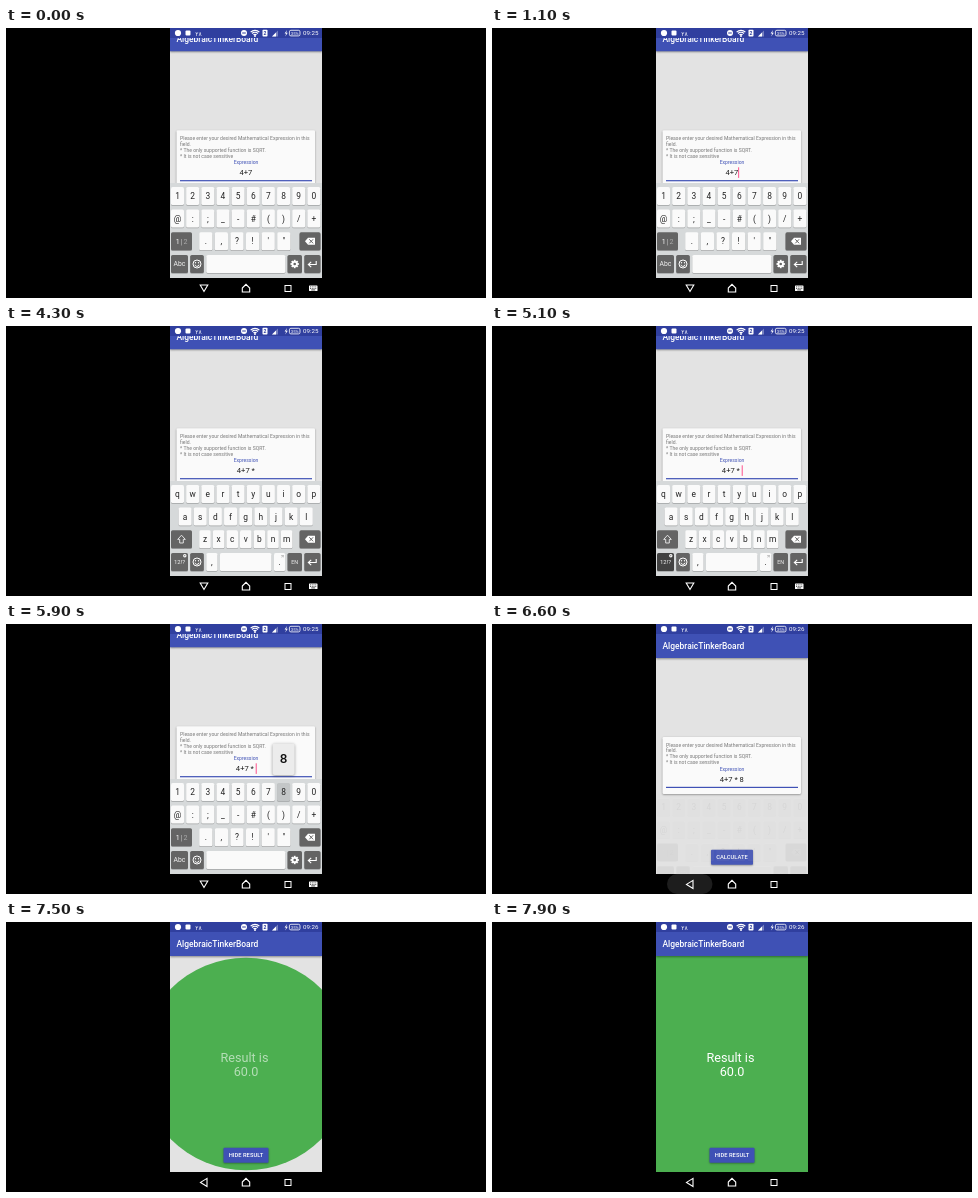
Write an HTML page with a canvas that moves like this. It is 480 px wide and 270 px high and loops after 8 s.

```html
<!DOCTYPE html>
<html lang="en">
<head>
<meta charset="utf-8">
<title>Calculator demo</title>
<style>
html, body { margin: 0; width: 100%; height: 100%; overflow: hidden; background: #000; }
canvas { display: block; width: 480px; height: 270px; }
</style>
</head>
<body>
<canvas id="stage" width="480" height="270"></canvas>
<script>
const g = document.getElementById('stage').getContext('2d');
const LOOP = 8000, INDIGO = '#3f51b5', GREEN = '#4caf50';
const LEFT = 164, WIDTH = 152, MID = 240;
const cursorOn = [[100, 600], [1000, 2000], [2600, 3000], [3100, 3400], [3900, 4300], [4800, 5300], [5600, 6300]];
const pages = {
  symbols: ['1234567890', '@:;_-#()/+', '.,?!\'"'],
  more: ['~^%*|[]<>=', '$€£¥&{}°\\`', '«»¿¡´¨'],
  letters: ['qwertyuiop', 'asdfghjkl', 'zxcvbnm']
};

const within = (t, a, b) => t >= a && t < b;

function rect(x, y, w, h, color) {
  g.fillStyle = color;
  g.fillRect(x, y, w, h);
}

function round(x, y, w, h, r, color) {
  g.fillStyle = color;
  g.beginPath();
  g.roundRect(x, y, w, h, r);
  g.fill();
}

function raised(x, y, w, h, r, color, blur = 2) {
  g.save();
  g.shadowColor = 'rgba(0,0,0,.4)';
  g.shadowBlur = blur;
  g.shadowOffsetY = .7;
  round(x, y, w, h, r, color);
  g.restore();
}

function text(s, x, y, size, color, align = 'center', weight = 400, family = 'Roboto') {
  g.font = `${weight} ${size}px ${family}, sans-serif`;
  g.textAlign = align;
  g.fillStyle = color;
  g.fillText(s, x, y);
}

function disc(x, y, r, color) {
  g.fillStyle = color;
  g.beginPath();
  g.arc(x, y, r, 0, 7);
  g.fill();
}

// Points are given as x0, y0, x1, y1, ...
function path(points, color, fill, width = 1) {
  g.beginPath();
  for (let i = 0; i < points.length; i += 2) g.lineTo(points[i], points[i + 1]);
  if (fill) {
    g.fillStyle = color;
    g.fill();
  } else {
    g.strokeStyle = color;
    g.lineWidth = width;
    g.stroke();
  }
}

function statusBar(t) {
  rect(LEFT, 0, WIDTH, 10, '#303f9f');
  disc(172, 5, 3.1, '#fff');
  round(179.5, 2.5, 5, 5, 1, '#fff');
  text('٢٨', 192.5, 7.5, 6, '#fff', 'center', 400, '"DejaVu Sans"');
  disc(238, 5, 3, '#fff');
  rect(236.2, 4.5, 3.6, 1, '#303f9f');
  g.strokeStyle = '#fff';
  g.lineWidth = 1.2;
  for (const r of [2.2, 4.2, 6.2]) {
    g.beginPath();
    g.arc(249, 8.5, r, -Math.PI * .75, -Math.PI * .25);
    g.stroke();
  }
  disc(249, 8, 1, '#fff');
  round(256.5, 1.8, 5, 6.8, .8, '#fff');
  text('2', 259, 7.2, 5, '#303f9f', 'center', 700);
  path([266, 8.5, 272, 8.5, 272, 2.5], 'rgba(255,255,255,.35)', true);
  path([266, 8.5, 270, 8.5, 270, 4.5], '#fff', true);
  path([281, 2, 278.6, 5.5, 280.2, 5.5, 279.2, 8.5, 281.8, 4.8, 280.2, 4.8], '#fff', true);
  g.strokeStyle = '#fff';
  g.lineWidth = .8;
  g.beginPath();
  g.roundRect(283.4, 2.3, 10.6, 5.6, 1.5);
  g.stroke();
  text('35%', 288.7, 6.7, 4.3, '#fff');
  text(t < 6000 ? '09:25' : '09:26', 312.5, 7.3, 6.2, '#fff', 'right');
}

function appBar(dy) {
  raised(LEFT, dy + 10, WIDTH, 24, 0, INDIGO);
  text('AlgebraicTinkerBoard', 170.5, dy + 25, 8.44, '#fff', 'left', 500);
}

function button(label, w, pressed) {
  raised(MID - w / 2, 225.8, w, 15, 1, pressed ? '#5565bf' : INDIGO, pressed ? 4 : 2);
  text(label, MID, 235.4, 5.8, '#fff', 'center', 500);
}

function card(t, dy) {
  raised(170.5, 113 + dy, 138.5, 57, 1.2, '#fafafa');
  ['Please enter your desired Mathematical Expression in this', 'field.',
    '* The only supported function is SQRT.', '* It is not case sensitive']
    .forEach((line, i) => text(line, 174, 122.5 + dy + i * 5.9, 5.06, '#777', 'left'));
  text('Expression', MID, 146.6 + dy, 5.06, INDIGO);
  const value = t < 3900 ? '4+7' : t < 4800 ? '4+7 *' : t < 6000 ? '4+7 * ' : '4+7 * 8';
  text(value, 239.8, 158 + dy, 7.6, '#222');
  const end = 239.8 + g.measureText(value).width / 2;
  rect(174, 162.8 + dy, 132, 1.2, INDIGO);
  if (cursorOn.some(([a, b]) => within(t, a, b))) rect(end, 150 + dy, .9, 10.6, '#ff4081');
}

function key(x, y, w, label, pressed, dark, size = 8.4) {
  const color = dark ? (pressed ? '#424242' : '#646464') : (pressed ? '#c3c6c7' : '#fafafa');
  round(x, y + .8, w, 18, 1.6, 'rgba(0,0,0,.25)');
  round(x, y, w, 18, 1.6, color);
  if (label) text(label, x + w / 2, y + 9 + size * .36, size, dark ? '#f2f2f2' : '#222');
}

function popup(x, label) {
  raised(x - 11, 119.5, 22, 31.5, 2, '#ececec', 3);
  text(label, x, 139.3, 13.5, '#111', 'center', 500);
}

function smiley(x, y) {
  g.strokeStyle = '#fff';
  g.lineWidth = 1;
  g.beginPath();
  g.arc(x, y, 4, 0, 7);
  g.stroke();
  disc(x - 1.5, y - 1.2, .7, '#fff');
  disc(x + 1.5, y - 1.2, .7, '#fff');
  g.beginPath();
  g.arc(x, y + .3, 2.1, .2, Math.PI - .2);
  g.stroke();
}

function gear(x, y) {
  g.strokeStyle = '#fff';
  g.lineWidth = 1.8;
  for (let a = 0; a < 8; a++) {
    const c = Math.cos(a * Math.PI / 4), s = Math.sin(a * Math.PI / 4);
    g.beginPath();
    g.moveTo(x + c * 2, y + s * 2);
    g.lineTo(x + c * 4.2, y + s * 4.2);
    g.stroke();
  }
  disc(x, y, 3.1, '#fff');
  disc(x, y, 1.3, '#646464');
}

function keyboard(t) {
  const page = t < 3100 ? 'symbols' : t < 4100 ? 'more' : t < 5400 ? 'letters' : 'symbols';
  const rows = pages[page], letters = page === 'letters';
  const star = within(t, 3600, 3900), eight = within(t, 5900, 6000);
  rect(LEFT, 155, WIDTH, 115, '#d6d9da');

  [...rows[0]].forEach((c, i) =>
    key(165 + i * 15.15, 159, 13, c, star && i === 3 || eight && i === 7));
  [...rows[1]].forEach((c, i) => key((letters ? 172.6 : 165) + i * 15.15, 181.5, 13, c));
  const pitch = letters ? 13.6 : 15.6, w = letters ? 11.6 : 13.2;
  [...rows[2]].forEach((c, i) => key(193.2 + i * pitch, 204.3, w, c));

  key(165, 204.3, 21, '', within(t, 2600, 3100), true);
  if (letters) {
    path([175.5, 209.2, 179.3, 213.4, 177.3, 213.4, 177.3, 217, 173.7, 217, 173.7, 213.4, 171.7, 213.4, 175.5, 209.2], '#eee', false, .9);
  } else {
    const second = page === 'more';
    text('1', 171.8, 216, 7, second ? '#aaa' : '#fff');
    text('|', 175.5, 215.6, 7, '#ccc');
    text('2', 179.4, 216, 7, second ? '#fff' : '#aaa');
  }
  key(293.5, 204.3, 21, '', false, true);
  path([299, 213.3, 302, 209.8, 309, 209.8, 309, 216.8, 302, 216.8], '#fff', true);
  path([303.3, 211.3, 307.1, 215.3], '#646464');
  path([307.1, 211.3, 303.3, 215.3], '#646464');

  const switching = within(t, 4000, 4100) || within(t, 5100, 5400);
  key(165, 227, 17, letters ? '12!?' : 'Abc', switching, true, letters ? 6 : 6.8);
  key(184.2, 227, 13.6, '', false, true);
  smiley(191, 236);
  if (letters) {
    disc(178.8, 229.7, 1.7, '#fff');
    disc(178.8, 229.7, .6, '#646464');
    key(200.3, 227, 11.2, ',');
    key(214, 227, 51.5, '', within(t, 4600, 4800));
    key(268, 227, 11.2, '.');
    text('?!', 276.5, 232, 4, '#666');
    key(281.5, 227, 14.5, 'EN', false, true, 5.4);
  } else {
    key(200.3, 227, 79, '');
    key(281.5, 227, 14.5, '', false, true);
    gear(288.7, 236);
  }
  key(298.3, 227, 16.2, '', false, true);
  path([310.2, 233, 310.2, 236.5, 303, 236.5], '#fff', false, 1.1);
  path([305.2, 233.8, 302.3, 236.5, 305.2, 239.2], '#fff', false, 1.1);

  if (star) popup(216.8, '*');
  if (eight) popup(277.6, '8');
}

function navBar(t) {
  const typing = t < 6400;
  rect(LEFT, 250, WIDTH, 20, '#000');
  if (within(t, 6300, 6700)) round(175, 250, 45.5, 20, 10, '#1d1d1d');
  path(typing ? [194.2, 257, 201.8, 257, 198, 263.5, 194.2, 257, 201.8, 257]
    : [201, 256.4, 201, 264.4, 194.5, 260.4, 201, 256.4, 201, 264.4], '#fff', false, 1.1);
  path([236.3, 260, 240, 256.3, 243.7, 260, 243.7, 264, 236.3, 264, 236.3, 260, 240, 256.3], '#fff', false, 1.1);
  g.lineWidth = 1;
  g.strokeStyle = '#fff';
  g.strokeRect(279, 257.5, 6, 6);
  if (!typing) return;
  round(303, 257.5, 8.5, 5.5, .6, '#fff');
  for (let i = 0; i < 8; i++) rect(304 + i % 4 * 1.8, 258.5 + (i >> 2) * 1.5, .8, .8, '#000');
  rect(305.2, 261.6, 4, .7, '#000');
}

function result(t) {
  const p = Math.min(1, (t - 7100) / 566);
  disc(MID, 142, 132.5 * (1 - Math.cos(Math.PI * p)) / 2, GREEN);
  if (t < 7200) return;
  const fade = Math.min(1, .3 + (t - 7300) / 700);
  g.globalAlpha = Math.max(0, fade);
  text('Result is ', MID, 139.5, 12.66, '#fff');
  text('60.0', MID, 154.3, 12.66, '#fff');
  g.globalAlpha = 1;
  if (within(t, 7300, 7400)) rect(213, 130, 54, 23, 'rgba(255,255,255,.1)');
}

function draw(now) {
  const t = Math.floor((now % LOOP) / 100) * 100;
  const dy = t < 6400 ? -10.7 : 0, done = t >= 7100;
  rect(0, 0, 480, 270, '#000');
  g.save();
  g.beginPath();
  g.rect(LEFT, 0, WIDTH, 270);
  g.clip();
  rect(LEFT, 0, WIDTH, 250, '#e3e3e3');
  if (done) result(t); else card(t, dy);
  button(done ? 'HIDE RESULT' : 'CALCULATE', done ? 45 : 42, within(t, 7100, 7300));
  appBar(dy);
  if (t < 6700) {
    const hide = Math.max(0, (t - 6300) / 300);
    g.save();
    g.globalAlpha = 1 - .95 * hide;
    g.translate(0, 15 * hide * hide);
    keyboard(t);
    g.restore();
  }
  statusBar(t);
  navBar(t);
  g.restore();
}

const start = performance.now();
function tick() {
  draw(performance.now() - start);
  requestAnimationFrame(tick);
}
tick();
</script>
</body>
</html>
```
